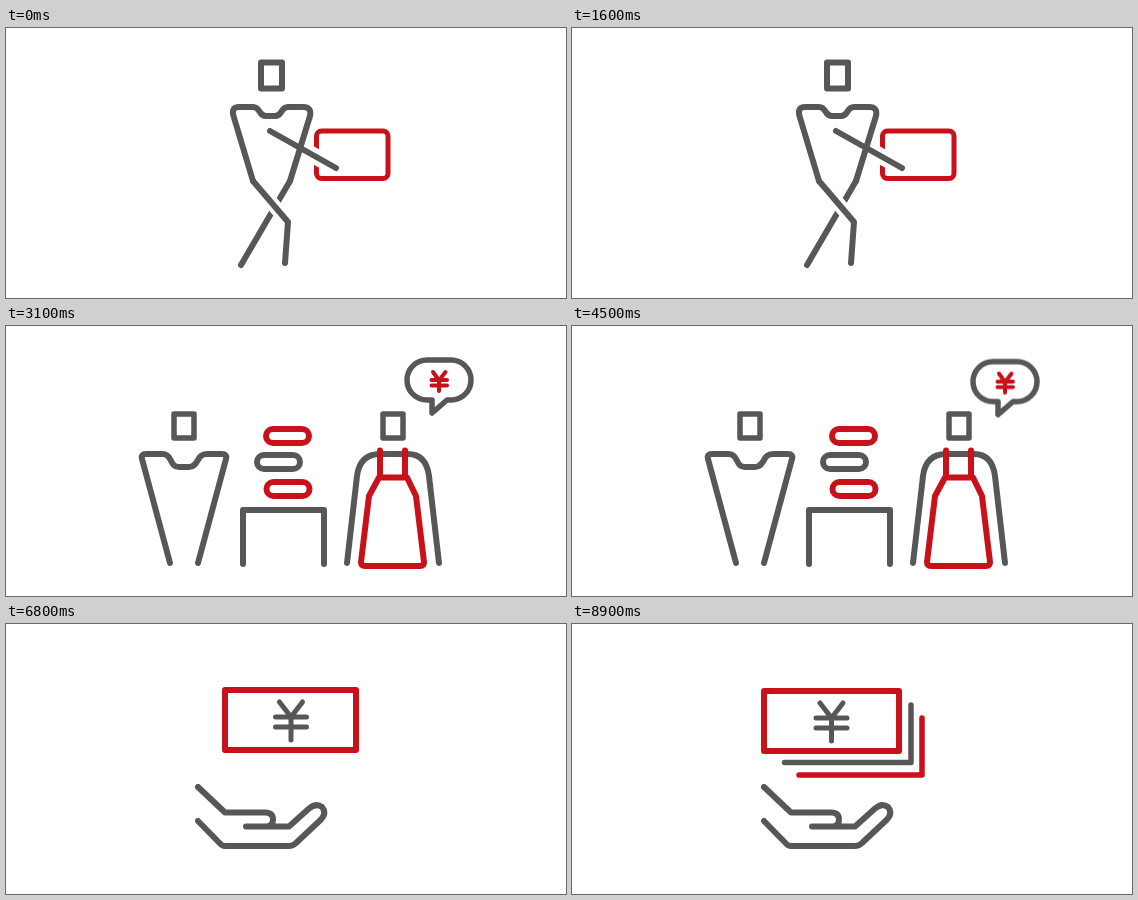
Write an HTML page without scripts that moves like this. It is 560 px wide and 270 px high and loops after 9.8 s.

```html
<!DOCTYPE html>
<html lang="en">
<head>
<meta charset="utf-8">
<title>Shopping and cash back</title>
<style>
html, body { margin: 0; width: 100%; height: 100%; overflow: hidden; background: #fff; }
svg { display: block; width: 560px; height: 270px; overflow: hidden; }
.ink { fill: none; stroke: #575757; stroke-width: 6; stroke-linecap: round; stroke-linejoin: round; }
.red { stroke: #c8111a; }
.gray { stroke: #575757; }
.halo { stroke: #fff; stroke-width: 14; }
.arm-halo { stroke: #fff; stroke-width: 16; stroke-linecap: butt; }
.thin { stroke-width: 5; }
.bill { fill: #fff; }

/* one shared 9.8 s clock */
.a { animation: 9.8s -2ms infinite step-end; }
.walk { animation-name: walk; }
.strip { animation-name: strip; }
.shop { animation-name: shop; }
.basket { animation-name: basket; }
.second { animation-name: second; }
.third { animation-name: third; }
.bubble { animation-name: bubble; }
.bob { animation-name: bob; }
.pay { animation-name: pay; }
.bill1 { animation-name: drop1; }
.bill2 { animation-name: drop2; }
.bill3 { animation-name: drop3; }
.edge1 { animation-name: edge1; }
.edge2 { animation-name: edge2; }

@keyframes walk { 0% { opacity: 1 } 25.5102%, 100% { opacity: 0 } }
@keyframes strip {
  0% { transform: translateX(0); animation-timing-function: steps(25) }
  25.5102%, 100% { transform: translateX(-14000px) }
}
@keyframes shop { 0% { opacity: 0 } 25.5102% { opacity: 1 } 65.3061%, 100% { opacity: 0 } }
@keyframes basket {
  0%, 25.5102% { transform: none; opacity: 1 }
  27.551% { transform: translateX(8px); opacity: 1 }
  29.5918%, 100% { transform: translateX(8px); opacity: 0 }
}
@keyframes second { 0% { opacity: 0 } 27.551%, 100% { opacity: 1 } }
@keyframes third { 0% { opacity: 0 } 29.5918%, 100% { opacity: 1 } }
@keyframes bubble { 0% { opacity: 0 } 31.6327%, 100% { opacity: 1 } }
@keyframes bob {
  0% { transform: translateY(0) }
  34.6939%, 44.898%, 55.102% { transform: translateY(0); animation-timing-function: steps(5) }
  39.7959%, 50% { transform: translateY(8px); animation-timing-function: steps(5) }
  60.2041%, 100% { transform: translateY(8px) }
}
@keyframes pay { 0% { opacity: 0 } 65.3061%, 100% { opacity: 1 } }

/* each bill falls in four steps, lands, then slides to its place */
@keyframes drop1 {
  0% { opacity: 0; transform: translate(0, -65px) }
  67.3469% { opacity: 1; transform: translate(0, -65px); animation-timing-function: steps(4) }
  71.4286% { opacity: 1; transform: translate(0, 15px) }
  72.449% { opacity: 1; transform: translate(0, 0) }
  81.6327%, 100% { opacity: 0; transform: translate(0, 0) }
}
@keyframes drop2 {
  0% { opacity: 0; transform: translate(13px, -53.5px) }
  76.5306% { opacity: 1; transform: translate(13px, -53.5px); animation-timing-function: steps(4) }
  80.6122% { opacity: 1; transform: translate(13px, 12.5px) }
  81.6327% { opacity: 1; transform: translate(0, 0) }
  90.8163%, 100% { opacity: 0; transform: translate(0, 0) }
}
@keyframes drop3 {
  0% { opacity: 0; transform: translate(13px, -54px) }
  85.7143% { opacity: 1; transform: translate(13px, -54px); animation-timing-function: steps(4) }
  89.7959% { opacity: 1; transform: translate(13px, 13px) }
  90.8163%, 100% { opacity: 1; transform: translate(0, 0) }
}
@keyframes edge1 { 0% { opacity: 0 } 81.6327%, 100% { opacity: 1 } }
@keyframes edge2 { 0% { opacity: 0 } 90.8163%, 100% { opacity: 1 } }
</style>
</head>
<body>
<svg viewBox="0 0 560 270" xmlns="http://www.w3.org/2000/svg">
<defs>
  <!-- near leg through one stride -->
  <path id="n0" d="M247 153L282 194L279 235"/>
  <path id="n1" d="M247 153L276 196L266 236"/>
  <path id="n2" d="M247 153L266 196L250 236"/>
  <path id="n3" d="M247 153L253 196L232 237"/>
  <path id="n4" d="M247 153L240 195L213 232"/>
  <path id="n5" d="M247 153L248 193L212 224"/>
  <path id="n6" d="M247 153L264 190L238 222"/>
  <path id="n7" d="M247 153L278 189L264 228"/>

  <g id="torso">
    <rect x="255" y="34.5" width="21" height="26"/>
    <rect class="red thin" x="310.5" y="103" width="71.5" height="47.5" rx="5"/>
    <path class="arm-halo" d="M264 103L330 140"/>
    <path d="M247 153L227.500 88Q225 79 233 79H247C255 79 252 88 260 88H269C277 88 274 79 282 79H297Q306 79 304 88L284 153"/>
    <path d="M264 103L330 140"/>
  </g>

  <g id="stride">
    <g><path d="M284 153L235 237"/><use href="#n0" class="halo"/><use href="#n0"/><use href="#torso"/></g>
    <g transform="translate(560 -1)"><path d="M284 153L256 193L214 230"/><use href="#n1" class="halo"/><use href="#n1"/><use href="#torso"/></g>
    <g transform="translate(1120 -3)"><path d="M284 153L268 192L235 222"/><use href="#n2" class="halo"/><use href="#n2"/><use href="#torso"/></g>
    <g transform="translate(1680 -2)"><path d="M284 153L288 190L268 222"/><use href="#n3" class="halo"/><use href="#n3"/><use href="#torso"/></g>
    <g transform="translate(2240 0)"><path d="M284 153L294 193L294 235"/><use href="#n4" class="halo"/><use href="#n4"/><use href="#torso"/></g>
    <g transform="translate(2800 -1)"><path d="M284 153L288 195L280 236"/><use href="#n5" class="halo"/><use href="#n5"/><use href="#torso"/></g>
    <g transform="translate(3360 -1)"><path d="M284 153L276 196L263 236"/><use href="#n6" class="halo"/><use href="#n6"/><use href="#torso"/></g>
    <g transform="translate(3920 0)"><path d="M284 153L267 196L248 237"/><use href="#n7" class="halo"/><use href="#n7"/><use href="#torso"/></g>
  </g>

  <rect id="head" width="20" height="24"/>
  <rect id="item" width="43" height="14" rx="7"/>
  <path id="yen" d="M-11.500 12L0 27L11.500 12M0 27V50M-15.500 27H15.500M-15.500 37H15.500"/>
</defs>

<g class="ink">
  <g class="a walk">
    <g class="a strip">
      <use href="#stride"/>
      <use href="#stride" x="4480"/>
      <use href="#stride" x="8960"/>
      <use href="#stride" x="13440"/>
    </g>
  </g>

  <g class="a shop">
    <g class="a basket">
      <rect class="red thin" x="71" y="163" width="70" height="48" rx="5"/>
      <path class="arm-halo" d="M172 158L122 190"/>
      <path d="M172 158L122 190"/>
    </g>
    <use href="#head" x="168" y="88" stroke-width="5.500"/>
    <path d="M164 237L136 133Q134.500 128 140 128H156C167 128 163 141 173 141H183C193 141 190 128 201 128H216Q221.500 128 220 133L192 237"/>

    <path d="M237 238V184H318V238"/>
    <use href="#item" class="red" x="260" y="103"/>
    <rect x="256" y="98" width="52" height="24" fill="#fff" stroke="none"/>
    <use href="#item" class="a third red" x="260" y="103"/>
    <use href="#item" class="a second" x="251" y="129"/>
    <use href="#item" class="red" x="260.500" y="156"/>

    <use href="#head" x="377" y="88" stroke-width="5.500"/>
    <path d="M341 237L351 150Q354 128 374 128H402Q420 128 423 150L433 237"/>
    <path class="red" d="M374 124.500V151M399 124.500V151M373 151.500H401L410 170L418 236Q418 240 414 240H359Q355 240 355 236L363 170Z"/>

    <g class="a bubble">
      <g class="a bob">
        <path stroke-width="5.500" d="M421 34H445A20 20 0 0 1 445 74H441L426 87V74H421A20 20 0 0 1 421 34Z"/>
        <path class="red" stroke-width="4" style="stroke-width:4" d="M427 46L433 54.500L439.500 46M433 54.500V65M425.500 54H441M425.500 59.500H441"/>
      </g>
    </g>
  </g>

  <g class="a pay">
    <path d="M192 163L219 188.500H259Q267 188.500 267 195.500Q267 202.500 260 202.500M240 202.500H283L303 184.500Q310 178.500 316 183Q321 189 315 195.500L290 219Q287 222 283 222H219Q216 222 214 219.500L192 197"/>

    <path class="a edge1 red" style="stroke-width:5.500" d="M227 151H350V94"/>
    <g class="a bill1">
      <rect class="bill red" x="219" y="91" width="131" height="60"/>
      <use href="#yen" class="gray thin" x="285" y="91"/>
    </g>
    <path class="a edge2" style="stroke-width:5.500" d="M212.500 138.500H339V81"/>
    <g class="a bill2">
      <rect class="bill" x="205" y="78.500" width="134" height="60"/>
      <use href="#yen" class="red thin" x="272" y="78.500"/>
    </g>
    <g class="a bill3">
      <rect class="bill red" x="192" y="67" width="135" height="60"/>
      <use href="#yen" class="gray thin" x="259.500" y="67"/>
    </g>
  </g>
</g>
</svg>
</body>
</html>
```
